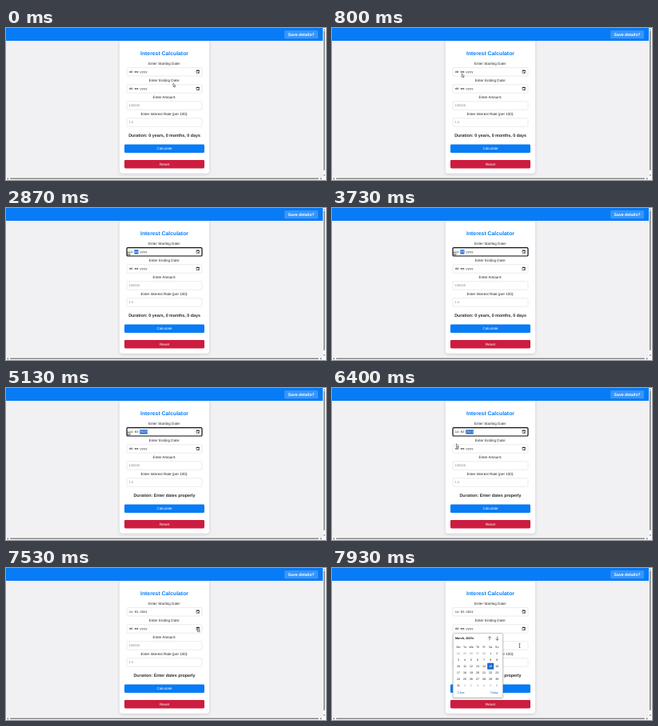
An HTML page with a canvas for the animation above (8000 ms loop, 400 by 190 pixels).

```html
<!DOCTYPE html>
<html lang="en">
<head>
<meta charset="utf-8">
<title>Interest Calculator</title>
<style>
  html, body { margin: 0; width: 100%; height: 100%; overflow: hidden; background: #f1f1f4; }
  canvas { display: block; width: 400px; height: 190px; }
</style>
</head>
<body>
<canvas id="stage"></canvas>
<script>
const LOOP = 8000, W = 400, H = 190;
const SANS = '"Liberation Sans", Arial, sans-serif';
const MONO = '"Liberation Mono", "Courier New", monospace';
const BLUE = '#087bf6', INK = '#25282c', HILITE = '#1769d2';
const CHAR = 2.28, DATE_X = 153.8;

const canvas = document.getElementById('stage');
const ctx = canvas.getContext('2d');
const ratio = window.devicePixelRatio || 1;
canvas.width = W * ratio;
canvas.height = H * ratio;

// time, x, y of the pointer tip
const path = [
  [0, 209, 69], [70, 209, 69], [500, 181, 61], [870, 158, 56], [930, 158, 56],
  [1200, 152.5, 54.5], [6200, 152.5, 54.5], [6400, 155.5, 69.7], [6530, 156, 71],
  [6730, 156, 71], [7530, 239.5, 75], [7800, 239.5, 75], [7930, 234.5, 97]
];

// time, day, month, year, selected part
const typing = [
  [0, 'dd', 'mm', 'yyyy', 0],
  [2130, '01', 'mm', 'yyyy', 0],
  [2330, '14', 'mm', 'yyyy', 1],
  [3730, '14', '00', 'yyyy', 1],
  [4130, '14', '03', 'yyyy', 2],
  [4730, '14', '03', '0002', 2],
  [5130, '14', '03', '0020', 2],
  [5330, '14', '03', '0202', 2],
  [5730, '14', '03', '2024', 2]
];
const FOCUS = 1130, BLUR = 7460, INVALID = 4730, POPUP = 7800;

function box(x, y, w, h, r, fill, stroke, line = 0.4) {
  ctx.beginPath();
  ctx.roundRect(x, y, w, h, r);
  if (fill) { ctx.fillStyle = fill; ctx.fill(); }
  if (stroke) { ctx.strokeStyle = stroke; ctx.lineWidth = line; ctx.stroke(); }
}

function shape(points, fill) {
  ctx.beginPath();
  points.forEach(([x, y]) => ctx.lineTo(x, y));
  ctx.closePath();
  ctx.fillStyle = fill;
  ctx.fill();
}

// y is the middle of the capitals
function text(str, x, y, size, color, align = 'center', weight = 400, family = SANS) {
  ctx.font = `${weight} ${size}px ${family}`;
  ctx.textAlign = align;
  ctx.fillStyle = color;
  ctx.fillText(str, x, y + size * 0.35);
}

function shadowed(color, blur, dy, draw) {
  ctx.save();
  ctx.shadowColor = color;
  ctx.shadowBlur = blur * ratio;
  ctx.shadowOffsetY = dy * ratio;
  draw();
  ctx.restore();
}

function calendarIcon(x, y) {
  box(x, y + 0.5, 3.6, 3.7, 0.3, null, '#222', 0.55);
  box(x, y + 0.4, 3.6, 1, 0, '#222');
  box(x + 1.8, y + 2.5, 1.1, 1.1, 0, '#222');
}

function field(y) {
  box(151, y, 94, 10.4, 1.2, '#fff', '#d2d2d5', 0.45);
}

function dateField(y, parts, selected, focused) {
  field(y);
  if (focused) box(151, y, 94, 10.4, 1.3, null, '#101318', 1.2);
  const mid = y + 5.2;
  parts.forEach((part, i) => {
    const x = DATE_X + i * 3 * CHAR;
    const on = focused && i === selected;
    if (on) box(x - 0.2, mid - 2.6, part.length * CHAR + 0.4, 5.2, 0.2, HILITE);
    text(part, x, mid, 3.8, on ? '#fff' : '#1b1b1b', 'left', 400, MONO);
    if (i < 2) text('-', x + 2 * CHAR, mid, 3.8, '#1b1b1b', 'left', 400, MONO);
  });
  calendarIcon(238, mid - 2.4);
}

function inputField(y, hint) {
  field(y);
  text(hint, 153.6, y + 5.2, 4, '#85858a', 'left');
}

function button(y, label, color) {
  box(148, y, 100, 10.6, 1.4, color);
  text(label, 198, y + 5.3, 4.55, '#fff');
}

function scrollbars() {
  box(396, 0, 4, H, 0, '#f8f8f8');
  box(0, 186.2, W, 3.8, 0, '#f8f8f8');
  box(396.9, 3.5, 1.7, 174.5, 0.8, '#858585');
  box(5, 187.5, 386, 1.6, 0.8, '#858585');
  shape([[397.8, 0.9], [399, 2.6], [396.6, 2.6]], '#666');
  shape([[397.8, 185], [399, 183.4], [396.6, 183.4]], '#666');
  shape([[1.2, 188.3], [3, 187.1], [3, 189.5]], '#666');
  shape([[395, 188.3], [393.2, 187.1], [393.2, 189.5]], '#666');
}

function page(t) {
  box(0, 0, W, H, 0, '#f1f1f4');
  shadowed('rgba(0,0,0,.14)', 4, 1, () => box(142, 10, 112, 171.8, 3.5, '#fff'));
  box(0, 0, 396, 16, 0, BLUE);
  box(348, 3, 42, 10.3, 1.5, '#3796fb');
  text('Save details?', 369, 8.2, 5.13, '#fff', 'center', 700);

  text('Interest Calculator', 198, 31.2, 6.84, BLUE, 'center', 700);
  ['Enter Starting Date:', 'Enter Ending Date:', 'Enter Amount:', 'Enter Interest Rate (per 100):']
    .forEach((label, i) => text(label, 198, 44 + i * 21.15, 4.55, INK));

  const [, day, month, year, selected] = typing.filter(s => s[0] <= t).pop();
  dateField(49.6, [day, month, year], selected, t >= FOCUS && t < BLUR);
  dateField(70.8, ['dd', 'mm', 'yyyy'], 0, false);
  inputField(91.8, '100000');
  inputField(112.8, '1.5');

  const length = t < INVALID ? '0 years, 0 months, 0 days' : 'Enter dates properly';
  text('Duration: ' + length, 198, 133.7, 5.34, INK, 'center', 700);
  button(145.5, 'Calculate', BLUE);
  button(164.9, 'Reset', '#cc1d40');
  scrollbars();
}

function arrow(x, y, dir) {
  ctx.beginPath();
  ctx.moveTo(x, y - 2.4 * dir);
  ctx.lineTo(x, y + 2.4 * dir);
  ctx.moveTo(x - 2, y + 0.4 * dir);
  ctx.lineTo(x, y + 2.4 * dir);
  ctx.lineTo(x + 2, y + 0.4 * dir);
  ctx.strokeStyle = '#333';
  ctx.lineWidth = 0.6;
  ctx.stroke();
}

function popup() {
  shadowed('rgba(0,0,0,.3)', 2.5, 0.7, () => box(151.3, 81.8, 62.2, 80.2, 0.8, '#fff'));
  box(151.3, 81.8, 62.2, 80.2, 0.8, null, '#aaa', 0.5);
  text('March, 2025', 154, 88, 3.75, '#111', 'left', 700);
  shape([[175.2, 87.4], [177.6, 87.4], [176.4, 88.9]], '#222');
  arrow(197, 88, -1);
  arrow(206.5, 88, 1);

  const colX = c => 158 + c * 8.03;
  ['Mo', 'Tu', 'We', 'Th', 'Fr', 'Sa', 'Su']
    .forEach((name, c) => text(name, colX(c), 98.3, 3.6, '#222'));
  for (let i = 0; i < 42; i++) {
    const n = i - 4, x = colX(i % 7), y = 106.6 + Math.floor(i / 7) * 8.08;
    const inside = n >= 1 && n <= 31;
    const label = n < 1 ? n + 28 : inside ? n : n - 31;
    const today = n === 15;
    if (today) box(x - 4, y - 4, 8, 8, 0.6, HILITE);
    text(label, x, y, 3.6, today ? '#fff' : inside ? '#181818' : '#8a8a8a', 'center', today ? 700 : 400);
  }
  text('Clear', 157, 155.8, 3.7, HILITE, 'left');
  text('Today', 207.7, 155.8, 3.7, HILITE, 'right');
}

function pointerAt(t) {
  const i = path.findIndex(p => p[0] > t);
  if (i < 0) return path[path.length - 1].slice(1);
  const [t0, x0, y0] = path[i - 1], [t1, x1, y1] = path[i];
  const k = (t - t0) / (t1 - t0);
  return [x0 + (x1 - x0) * k, y0 + (y1 - y0) * k];
}

function pointer(t) {
  const [x, y] = pointerAt(t);
  if (t >= 7900) {
    box(x - 0.3, y - 2.6, 0.6, 5.2, 0, '#333');
    box(x - 1, y - 2.8, 2, 0.5, 0, '#333');
    box(x - 1, y + 2.3, 2, 0.5, 0, '#333');
    return;
  }
  const outline = [[0, 0], [0, 4.5], [1, 3.6], [1.7, 5.1], [2.4, 4.8], [1.8, 3.3], [3.1, 3.2]];
  shape(outline.map(([dx, dy]) => [x + dx, y + dy]), '#fff');
  ctx.strokeStyle = '#222';
  ctx.lineWidth = 0.5;
  ctx.stroke();
}

const start = performance.now();
function frame(now) {
  const t = Math.max(0, now - start) % LOOP;
  ctx.setTransform(ratio, 0, 0, ratio, 0, 0);
  ctx.textRendering = 'geometricPrecision';
  page(t);
  if (t >= POPUP) popup();
  pointer(t);
  requestAnimationFrame(frame);
}
frame(start);
</script>
</body>
</html>
```
